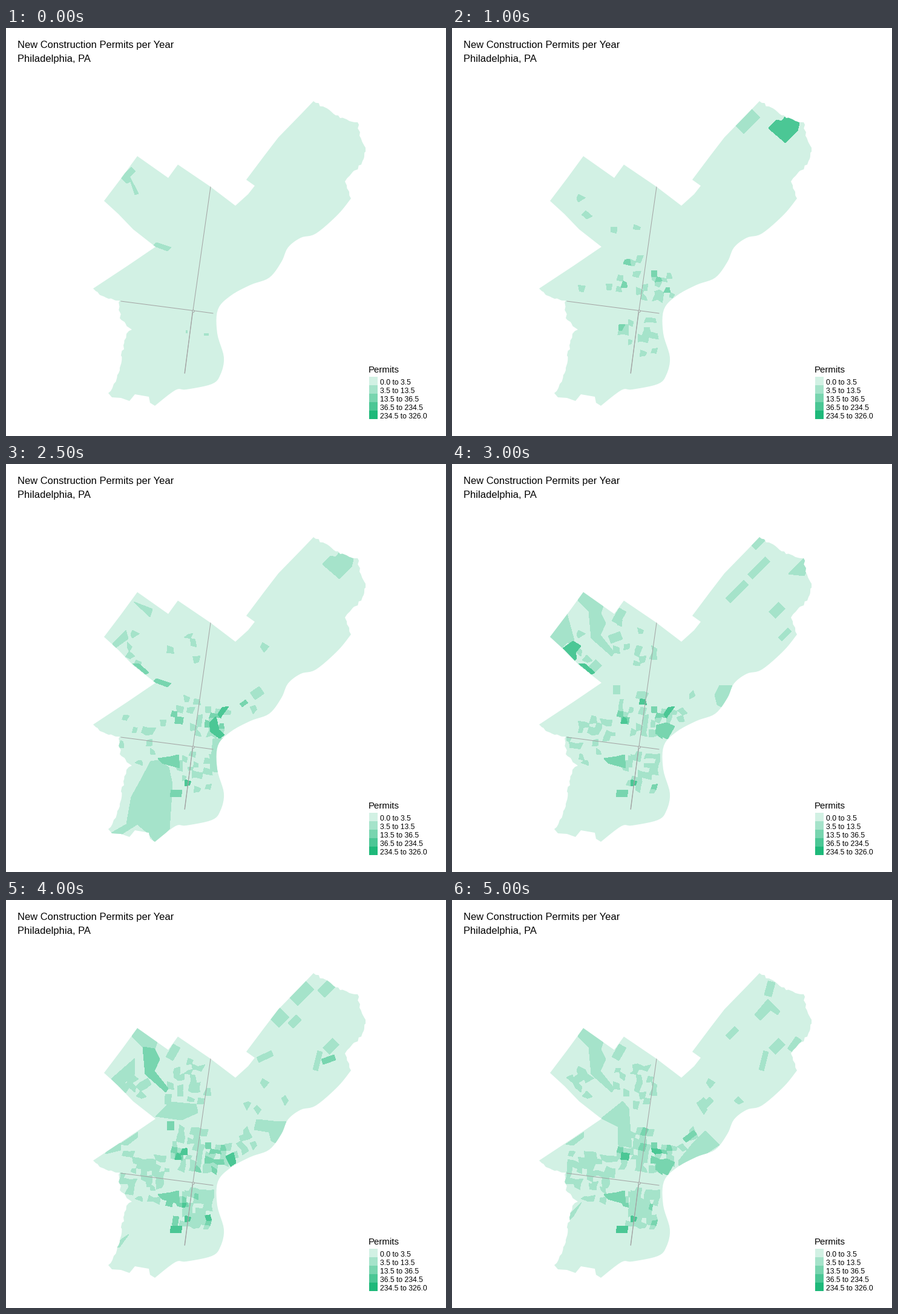
Write a matplotlib script that moves like this. It is 727 by 675 pixels and loops after 5500 ms.

```python
import math
import random
import matplotlib.pyplot as plt
from matplotlib.animation import FuncAnimation
from matplotlib.collections import PolyCollection
from matplotlib.patches import Polygon, Rectangle

W, H, DPI = 727, 675, 64
YEARS, STEP = 11, 500
STREET_TILT = 8
ROAD = "#a3a3a3"
COLORS = [((210 - 45 * k) / 255, (241 - 14 * k) / 255, (228 - 26.5 * k) / 255)
          for k in range(5)]
LABELS = ["0.0 to 3.5", "3.5 to 13.5", "13.5 to 36.5", "36.5 to 234.5", "234.5 to 326.0"]

plt.rcParams["font.family"] = "Liberation Sans"
yearly = [[] for _ in range(YEARS)]  # (class, outline) pairs for each year


def px(n):
    return n * 72 / DPI


def turn(x, y, cx, cy, tilt):
    c, s = math.cos(math.radians(tilt)), math.sin(math.radians(tilt))
    return cx + x * c - y * s, cy + x * s + y * c


def jag(points, size, seed):
    """Break a shoreline into short uneven steps."""
    rng = random.Random(seed)
    out = []
    for (x0, y0), (x1, y1) in zip(points, points[1:]):
        n = max(1, round(math.hypot(x1 - x0, y1 - y0) / 5))
        for k in range(n):
            d = size if k else 0
            out.append((x0 + (x1 - x0) * k / n + rng.uniform(-d, d),
                        y0 + (y1 - y0) * k / n + rng.uniform(-d, d)))
    return out + [points[-1]]


def curve(points, n=6):
    """Catmull-Rom curve through the points."""
    p = [points[0], *points, points[-1]]
    out = []
    for a, b, c, d in zip(p, p[1:], p[2:], p[3:]):
        for t in (k / n for k in range(n)):
            out.append(tuple(.5 * (2 * q + (r - o) * t + (2 * o - 5 * q + 4 * r - s) * t ** 2
                                   + (3 * q - o - 3 * r + s) * t ** 3)
                             for o, q, r, s in zip(a, b, c, d)))
    return out + [points[-1]]


def tract(levels, *points):
    """A large tract; levels maps year to colour class."""
    for year, level in levels.items():
        yearly[year].append((level, points))


def lot(levels, cx, cy, w, h, tilt=-45):
    tract(levels, *(turn(w * a, h * b, cx, cy, tilt)
                    for a, b in ((-.5, -.5), (.5, -.5), (.5, .5), (-.5, .5))))


def district(cx, cy, w, h, cell, tilt, base, peak, hot=0):
    """Mosaic of small tracts whose active share grows from base to peak."""
    rng = random.Random(cx * cy)
    nx, ny = round(w / cell), round(h / cell)
    knots = {(i, j): turn((i - nx / 2 + rng.uniform(-.28, .28)) * cell,
                          (j - ny / 2 + rng.uniform(-.28, .28)) * cell, cx, cy, tilt)
             for i in range(nx + 1) for j in range(ny + 1)}
    for i in range(nx):
        for j in range(ny):
            quad = knots[i, j], knots[i + 1, j], knots[i + 1, j + 1], knots[i, j + 1]
            rank = rng.random()
            for year in range(1, YEARS):
                t = min(max((year - 4) / 4, 0), 1)
                share = base + (peak - base) * t * t * (3 - 2 * t)
                # Some tracts swap places from year to year
                now = rng.random() if rng.random() < .3 else rank
                if now < share:
                    level = 2 + (now < share * hot) + (now < share * hot * .25)
                    yearly[year].append((level, quad))


# City limits
northwest = [(144, 431), (200, 394), (247, 362), (210, 333), (186, 308), (162, 286),
             (190, 249), (217, 212), (268, 248), (284, 226), (337, 262), (379, 294),
             (400, 275), (411, 261), (397, 251), (427, 211), (450, 181), (488, 142)]
creek = jag([(508, 121), (537, 138), (552, 149), (581, 156), (584, 178), (594, 198),
             (587, 226), (573, 238), (560, 254), (570, 282)], 1.8, 3)
delaware = curve([(570, 282), (548, 309), (512, 340), (487, 347), (466, 363), (455, 387),
                  (435, 413), (404, 425), (371, 443), (350, 466), (349, 505), (360, 545),
                  (354, 574), (340, 589), (298, 598), (280, 599), (246, 625)])
shore = [(238, 620), (236, 610), (213, 606), (204, 617), (190, 612), (175, 611)]
west = jag([(169, 604), (178, 589), (188, 566), (194, 525), (199, 506), (208, 499),
            (188, 480), (188, 451), (165, 446), (144, 431)], 1.8, 5)

# Small tracts: centre, size, cell, tilt, first and last share, share of hot ones
district(300, 412, 50, 72, 9, STREET_TILT, .22, .58, .2)
district(348, 428, 40, 48, 8, STREET_TILT, .5, .8, .4)
district(387, 402, 44, 34, 9, -30, .08, .5, .08)
district(316, 510, 44, 62, 8, STREET_TILT, .25, .78, .12)
district(283, 495, 30, 24, 8, STREET_TILT, .45, .7, .35)
district(230, 446, 84, 50, 9, STREET_TILT, .06, .4)
district(222, 484, 60, 30, 9, STREET_TILT, .03, .3)
district(303, 308, 74, 92, 9, STREET_TILT, .03, .26)
district(214, 306, 40, 54, 10, -45, .12, .22)
district(430, 335, 80, 60, 9, -40, .01, .07)

# Northeast
tract({1: 3, 2: 4, 3: 4, 4: 4, 5: 2}, (523, 166), (536, 152), (545, 154), (551, 146),
      (574, 157), (571, 170), (551, 190))
tract({6: 2, 7: 2}, (556, 182), (577, 160), (582, 155), (586, 176), (582, 185))
lot({6: 2}, 505, 130, 20, 12)
lot({6: 2}, 507, 172, 40, 11)
lot({6: 2}, 471, 211, 42, 11)
lot({10: 2}, 463, 220, 21, 9)
lot({1: 2, 6: 2, 8: 2, 10: 2}, 537, 242, 22, 15)
lot({1: 2}, 446, 248, 20, 10, -30)
lot({1: 2, 6: 2}, 550, 282, 22, 8)
lot({2: 2, 8: 2}, 488, 154, 38, 20)
lot({4: 2, 8: 2}, 530, 146, 26, 16)
lot({8: 2}, 451, 194, 24, 24)
lot({8: 2}, 477, 201, 19, 12)
lot({8: 2}, 428, 259, 26, 9, -25)
lot({8: 3}, 533, 264, 22, 9, -20)
lot({8: 2, 10: 2}, 515, 266, 8, 32, 14)
tract({10: 2}, (500, 190), (522, 164), (542, 184), (538, 190), (526, 182), (510, 199))
lot({4: 2, 10: 2}, 525, 147, 12, 24, 15)
lot({10: 2}, 566, 239, 24, 11, -55)
lot({10: 2}, 421, 337, 22, 9)

# Northwest
tract({0: 2}, (190, 248), (207, 230), (214, 237), (204, 246), (219, 274), (213, 276),
      (206, 254), (199, 257))
tract({0: 2, 1: 2, 5: 3}, (243, 360), (248, 355), (273, 363), (267, 369))
tract({3: 2, 6: 2}, (162, 286), (190, 248), (202, 292), (190, 296), (181, 305))
tract({1: 2, 4: 2, 5: 2}, (176, 298), (198, 275), (202, 289), (181, 304))
tract({8: 2}, (174, 296), (213, 262), (213, 288), (188, 309))
tract({6: 4}, (182, 306), (200, 293), (213, 301), (204, 312), (206, 321), (202, 326))
tract({1: 3, 3: 3, 5: 3, 6: 4}, (209, 330), (220, 331), (236, 345), (231, 348))
tract({5: 2}, (211, 228), (242, 240), (238, 253))
tract({6: 2, 8: 2, 10: 2}, (208, 225), (217, 212), (250, 235), (246, 247), (225, 243))
tract({6: 2, 8: 3, 9: 2, 10: 2}, (226, 243), (245, 246), (254, 263), (245, 283),
      (268, 312), (264, 318), (230, 288))
lot({6: 2}, 270, 287, 20, 13, -20)
lot({6: 2, 8: 2, 10: 2}, 276, 252, 24, 13, -60)
lot({6: 2}, 236, 335, 18, 14)
lot({3: 2, 6: 2, 8: 3}, 272, 373, 12, 15, 0)
tract({8: 2}, (247, 358), (272, 334), (314, 338), (317, 352), (290, 364))
tract({10: 2}, (247, 361), (282, 333), (292, 345), (297, 410), (275, 405), (274, 375))

# Riverfront
tract({1: 2, 10: 2}, (374, 432), (400, 400), (418, 382), (442, 405), (404, 430), (376, 445))
tract({6: 2, 8: 2}, (434, 382), (442, 366), (463, 366), (456, 386), (449, 404), (438, 398))
tract({8: 2}, (410, 380), (414, 363), (442, 366), (434, 384))
lot({3: 2, 5: 2}, 415, 379, 18, 14, -35)
lot({3: 2, 5: 3}, 393, 396, 11, 6, -35)
lot({10: 3}, 393, 391, 22, 8, -38)
tract({1: 3, 3: 3, 6: 3, 10: 3}, (336, 446), (338, 432), (354, 428), (368, 434), (356, 455))
tract({3: 4, 5: 4}, (336, 428), (347, 418), (352, 440), (361, 448), (353, 454), (338, 443))
tract({1: 4, 3: 4, 5: 4, 6: 4}, (350, 414), (357, 403), (368, 401), (354, 420))
tract({8: 4}, (363, 424), (376, 418), (380, 435), (371, 441))
tract({1: 2, 5: 2}, (337, 508), (342, 455), (358, 453), (351, 466), (349, 510))
lot({3: 3, 5: 3, 6: 3, 8: 3, 10: 4}, 286, 424, 13, 11, STREET_TILT)

# West and south
tract({8: 2}, (164, 420), (178, 405), (190, 402), (189, 414))
tract({8: 2, 10: 2}, (188, 404), (218, 384), (218, 392), (200, 406))
tract({8: 2, 9: 2}, (181, 574), (190, 562), (203, 553), (187, 575))
tract({10: 2}, (192, 531), (194, 520), (214, 500), (200, 524))
tract({1: 2, 3: 2, 4: 2, 5: 2}, (173, 611), (199, 596), (207, 551), (222, 524), (239, 492),
      (252, 490), (269, 502), (275, 530), (270, 604), (246, 626), (236, 612), (217, 596),
      (190, 613))
tract({3: 2}, (270, 569), (354, 573), (346, 590), (280, 600), (266, 610))
tract({3: 2, 5: 3, 6: 3, 8: 3, 10: 3}, (251, 487), (272, 484), (285, 481), (287, 503),
      (258, 495))
lot({1: 3, 3: 3, 5: 3, 6: 3, 7: 4, 8: 4, 9: 4, 10: 4}, 281, 545, 18, 11, 3)
lot({8: 3}, 280, 531, 9, 15, STREET_TILT)
lot({0: 2}, 298, 502, 3, 5, 0)
lot({0: 2}, 331, 507, 8, 4, 0)

fig = plt.figure(figsize=(W / DPI, H / DPI), dpi=DPI, facecolor="white")
ax = fig.add_axes((0, 0, 1, 1))
ax.set(xlim=(0, W), ylim=(H, 0))
ax.axis("off")

city = Polygon(northwest + creek + delaware + shore + west, fc=COLORS[0], ec="none")
ax.add_patch(city)
shapes = PolyCollection([], edgecolors="none", antialiaseds=False, zorder=2)
ax.add_collection(shapes, autolim=False)
shapes.set_clip_path(city)

# The two main streets meet at the central square
ax.plot((338, 309, 295), (263, 467, 571), color=ROAD, lw=px(1), zorder=3)
ax.plot((308, 295.5), (471, 571), color=ROAD, lw=px(1), zorder=3)
ax.plot((190, 309, 342), (452, 467.5, 472), color=ROAD, lw=px(1), zorder=3)
ax.plot(309, 467.5, "o", ms=px(3.5), mfc=COLORS[0], mec=ROAD, mew=px(1), zorder=4)

ax.text(19, 33, "New Construction Permits per Year", size=px(16.45))
ax.text(19, 56, "Philadelphia, PA", size=px(16.45))
ax.text(599, 570, "Permits", size=px(15))
for k, (color, label) in enumerate(zip(COLORS, LABELS)):
    ax.add_patch(Rectangle((600, 577 + 14 * k), 14, 14, fc=color, ec="none"))
    ax.text(618, 590 + 14 * k, label, size=px(12.1))


def draw(year):
    shown = sorted(yearly[year], key=lambda item: item[0])
    shapes.set_verts([outline for _, outline in shown])
    shapes.set_facecolor([COLORS[level - 1] for level, _ in shown])
    return [shapes]


anim = FuncAnimation(fig, draw, frames=YEARS, interval=STEP, repeat=True, repeat_delay=0)
plt.show()
```
